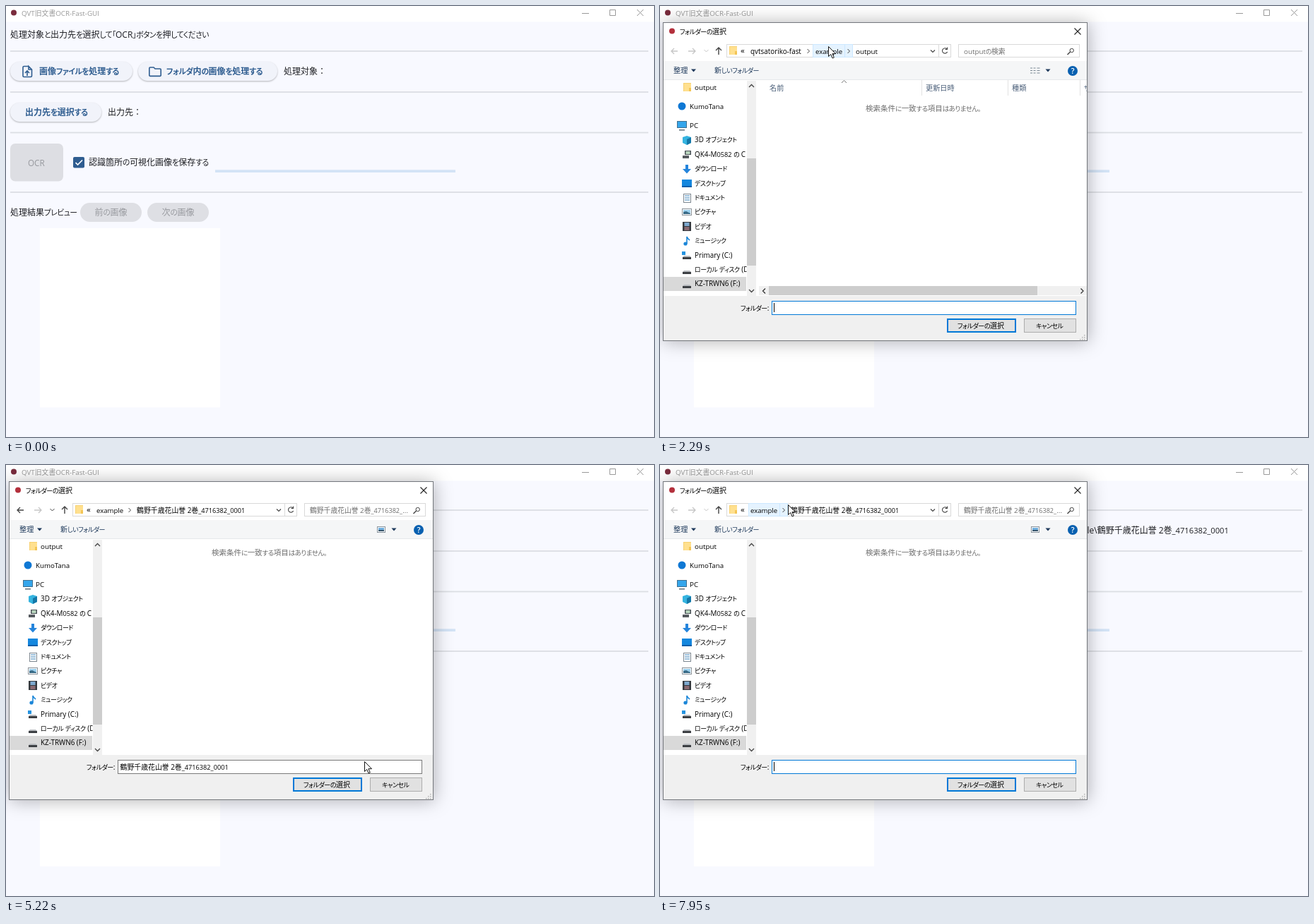
An HTML page for the animation above (7.99 s loop, 917 by 611 pixels).

```html
<!DOCTYPE html>
<html lang="ja">
<head>
<meta charset="utf-8">
<title>OCR</title>
<style>
html, body { margin: 0; width: 100%; height: 100%; overflow: hidden; background: #f8f9ff; }
svg { display: block; width: 100%; height: 100%; }
text { font-family: "Open Sans", "Noto Sans CJK JP", "Noto Sans CJK", sans-serif; white-space: pre; }
.k { font-size: .9em; letter-spacing: -.05em; font-feature-settings: "palt"; }
.d { font-size: .93em; }
.b { font-weight: 600; }
.m { font-weight: 500; }
.pill { filter: drop-shadow(0 1px 1px rgba(0,0,0,.28)); }
#dialog > .frame { filter: drop-shadow(1px 1px 13px rgba(0,0,0,.3)); }
</style>
</head>
<body>
<svg id="stage" viewBox="0 0 917 611"></svg>
<script>
const LOOP = 7990;
const BOOK = '鶴野千歳花山誉 2巻_4716382_0001';
const APP = 'qvtsatoriko-fast';
const BLUE = '#2f5d90', GREY = '#6d6d6d', ACCENT = '#0078d7';

// Kana and long numbers are set a little smaller than the rest of the line.
const runs = s => s.replace(/([ぁ-ヿ「」。]+)|[\d_\/:]{4,}/g,
  (m, kana) => `<tspan class="${kana ? 'k' : 'd'}">${m}</tspan>`);
const T = (x, cy, s, size = 10, fill = '#000', more = '') =>
  `<text x="${x}" y="${Math.round(cy + size * .37)}" font-size="${size}" fill="${fill}" ${more}>${runs(s)}</text>`;
const R = (x, y, w, h, fill, more = '') =>
  `<rect x="${x}" y="${y}" width="${w}" height="${h}" fill="${fill}" ${more}/>`;
const B = (x, y, w, h, fill, line, more = '') =>
  R(x + .5, y + .5, w - 1, h - 1, fill, `stroke="${line}" ${more}`);
const L = (d, color, width = 1, more = '') =>
  `<path d="${d}" fill="none" stroke="${color}" stroke-width="${width}" ${more}/>`;
const F = (d, fill) => `<path d="${d}" fill="${fill}"/>`;
const C = (x, y, r, fill, more = '') => `<circle cx="${x}" cy="${y}" r="${r}" fill="${fill}" ${more}/>`;
const G = (id, ...parts) => `<g id="${id}">${parts.join('')}</g>`;
const folder = (x, cy) => R(x, cy - 6, 11, 12, '#f7d171') + R(x + 1, cy - 5, 10, 11, '#ffe08f') + R(x + 8, cy + 1, 3, 5, '#f3c555');
const chevron = (x, y) => L(`M${x - 1.5} ${y - 3}l3 3l-3 3`, '#444');
const down = (x, y, color = '#444', w = 1.2) => L(`M${x - 3} ${y - 1.5}l3 3l3-3`, color, w);
const triangle = (x, y) => F(`M${x - 3.5} ${y - 2}h7l-3.5 4z`, '#1e395b');

const pills = [
  { id: 'files', x: 6, y: 79, w: 173 },
  { id: 'folder', x: 187, y: 79, w: 197 },
  { id: 'dest', x: 6, y: 137, w: 129 }
];
const pill = p => `<clipPath id="clip-${p.id}">${R(p.x, p.y, p.w, 27, '#000', 'rx="13.5"')}</clipPath>`
  + R(p.x, p.y, p.w, 27, '#f1f3fa', `rx="13.5" class="pill" id="${p.id}"`)
  + C(0, 0, 0, '#ccd7e4', `id="wave-${p.id}" clip-path="url(#clip-${p.id})"`);
const offPill = (x, s, tx) => R(x, 279, 87, 27, '#dedfe4', 'rx="13.5"') + T(tx, 293, s, 12, '#97999e', 'class="m"');

const mainWindow = () => G('main',
  R(0, 0, 917, 611, '#f8f9ff'), R(0, 0, 917, 22.5, '#fff'),
  C(11, 9.5, 4, '#7a2c3d'),
  G('titleBar',
    T(22, 10, 'QVT旧文書OCR-Fast-GUI', 9.8, 'currentColor'),
    L('M815 10.5h10M854.5 5.5h8v8h-8zM893 5l9 9M902 5l-9 9', 'currentColor')),
  T(6, 41, '処理対象と出力先を選択して「OCR」ボタンを押してください', 12, '#1c1d21'),
  ...[64, 122, 179.5, 264].map(y => R(6, y - .9, 903, 1.8, '#dcdee4')),
  ...pills.map(pill),
  L('M32 85.500h-6.500a1.500 1.500 0 0 0-1.500 1.500v12a1.500 1.500 0 0 0 1.500 1.500h9.500a1.500 1.500 0 0 0 1.500-1.500v-9l-4.500-4.500v4.500h4.500M30 99v-6.500M27 95l3-3l3 3', BLUE, 1.6),
  T(47, 93, '画像ファイルを処理する', 12, BLUE, 'class="b"'),
  L('M204 87h5l2 2h7a1.200 1.200 0 0 1 1.200 1.200v8a1.200 1.200 0 0 1-1.200 1.200h-14a1.200 1.200 0 0 1-1.200-1.200v-10a1.200 1.200 0 0 1 1.200-1.200z', BLUE, 1.6),
  T(227, 93, 'フォルダ内の画像を処理する', 12, BLUE, 'class="b"'),
  T(393, 93, '処理対象：', 12, '#1c1d21'),
  G('target', T(461, 93, `F:\\${APP}\\example\\${BOOK}`, 12, '#1c1d21')),
  T(27, 151, '出力先を選択する', 12, BLUE, 'class="b"'),
  T(144, 151, '出力先：', 12, '#1c1d21'),
  R(6, 195, 75, 53.500, '#dddee3', 'rx="7"'),
  T(31, 222.5, 'OCR', 11.7, '#97999e', 'class="m"'),
  R(95, 214, 16, 15.5, BLUE, 'rx="2"'), L('M98.500 222l3 3l6.500-6.500', '#fff', 1.7),
  T(117, 222, '認識箇所の可視化画像を保存する', 12, '#1c1d21'),
  R(296, 232.300, 340, 3.700, '#d3e3f6'),
  T(6, 293, '処理結果プレビュー', 12, '#1c1d21'),
  offPill(105, '前の画像', 125.5), offPill(200, '次の画像', 220.5),
  R(48, 315, 255, 254, '#fff'));

const drive = y => F(`M34 ${y + 1}h8l2 2h-12z`, '#b9bcc0') + R(32, y + 3, 12, 3, '#3c3f43');
const places = [
  ['3D オブジェクト', y => F(`M38 ${y - 6}l6 2v8l-6 3l-6-3v-8z`, '#35b4e0') + F(`M38 ${y - 1}l6-3v8l-6 3z`, '#1478a8')],
  ['QK4-M0582 の C', y => R(35, y - 5, 9, 6, '#4a5157') + R(36.5, y - 4, 6, 4, '#b8d5bd') + R(32, y + 2, 9, 4, '#565b60')],
  ['ダウンロード', y => F(`M36 ${y - 6}h4v6h4l-6 6.500l-6-6.500h4z`, '#2585dc')],
  ['デスクトップ', y => R(31, y - 5, 14, 11, '#1487de') + R(31, y + 4, 14, 2, '#0b5da8')],
  ['ドキュメント', y => B(33, y - 6, 11, 13, '#fff', '#7d8790') + L(`M35 ${y - 3}h7M35 ${y}h7M35 ${y + 3}h7`, '#3d83b8')],
  ['ピクチャ', y => B(31, y - 5, 14, 10, '#fff', '#8a9299') + R(33, y - 3, 10, 6, '#9bd0ee') + F(`M33 ${y + 3}v-3l4-1l6 3v1z`, '#386a86')],
  ['ビデオ', y => R(32, y - 6, 12, 13, '#34383d') + R(34.5, y - 5, 7, 5, '#7ea9cf') + R(34.5, y + 1, 7, 5, '#8a6a72')],
  ['ミュージック', y => C(36, y + 4, 2.600, '#1b86d8') + L(`M38 ${y + 4}v-10q1 3 4 5`, '#1b86d8', 1.6)],
  ['Primary (C:)', y => drive(y) + R(31, y - 5, 5, 5, '#2593e0')],
  ['ローカル ディスク (D:)', drive],
  ['KZ-TRWN6 (F:)', drive]
];
const sidebar = () =>
  R(5, 384, 117, 20, '#d9d9d9') + folder(33, 115) + T(49, 115.5, 'output', 9.8)
  + C(31, 142, 5.5, '#0f78d4') + T(42, 142.5, 'KumoTana', 9.7)
  + B(24, 163, 14, 10, '#35a6ec', '#41708f') + R(27, 175, 8, 1.500, '#5d6b75') + T(42, 169.5, 'PC', 9.8)
  + `<clipPath id="side">${R(5, 106, 117.500, 304, '#000')}</clipPath><g clip-path="url(#side)">`
  + places.map(([name, icon], i) => icon(Math.round(190 + i * 20.4)) + T(49, 189.7 + i * 20.4, name, 9.9)).join('') + '</g>'
  + R(123, 106, 13, 305, '#f0f0f0') + R(123, 216, 13, 152, '#cdcdcd')
  + L('M126 115l3.500-3.500l3.500 3.500M126 402l3.500 3.500l3.500-3.500', '#444', 1.3);

const rows = [
  ['output', '14:31'],
  [BOOK, '14:29'],
  ['五七夜ことはぐさ_6148205_0001', '13:54'],
  ['雲海夢路銀小箱 _ 3巻_3057916_0001', '14:26']
];
const row = ([name, time], i) => {
  const y = 140.5 + i * 18;
  return folder(157, y) + T(173, y, name, 9.9) + T(376, y, '2024/11/19 ' + time, 10, GREY)
    + T(498, y, 'ファイル フォルダー', 9.9, GREY);
};
const empty = y => T(291, y, '検索条件に一致する項目はありません。', 10.5, GREY);
const search = s => T(430, 64, s, 9.8, GREY);
const base = T(128, 64, APP, 9.9) + chevron(210, 64) + T(220, 64, 'example', 9.6) + chevron(267, 64);

const dialog = () => G('dialog',
  B(4, 23, 601, 452, '#fff', '#74777c', 'class="frame"'),
  C(17, 35.5, 4, '#b3303c'), T(28, 36, 'フォルダーの選択'),
  L('M586.500 31.500l9 9M595.500 31.500l-9 9', '#222', 1.1),
  G('nav', L('M25 64h-9M20 60l-4 4l4 4', 'currentColor', 1.3), down(65.5, 63.500, 'currentColor', 1)),
  L('M40 64h9M46 60l4 4l-4 4', '#c6c6c6', 1.3),
  L('M83 69v-10M79 63l4-4l4 4', '#444', 1.4),
  B(94, 54, 318, 19, '#fff', '#d9d9d9'),
  G('crumb', B(0, 54, 60, 19, '#e5f3ff', '#cce8ff', 'id="crumbBox"'), L('M0 54v19', '#cce8ff', 1, 'id="crumbLine"')),
  folder(98, 63), T(114, 62.5, '«', 11.5),
  down(386, 64), L('M394.500 54v19', '#d9d9d9'),
  L('M406 61a3.700 3.700 0 1 0 .6 4M406.500 58.500v3h-3', '#444', 1.1),
  B(422, 54, 172, 19, '#fff', '#d9d9d9'),
  L('M580.500 65l-4 4', '#444', 1.4), L('M580 63a2.700 2.700 0 1 0 5.400 0a2.700 2.700 0 1 0-5.400 0', '#444'),
  R(5, 78, 599, 27, '#f5f6f7'), R(5, 104, 599, 1, '#e6e8ea'),
  T(19, 91.5, '整理', 10.2, '#1e395b'), triangle(47.5, 91.5),
  T(77, 91.5, '新しいフォルダー', 10, '#1e395b'), triangle(549, 91.5),
  C(584, 92, 7, '#0860b0'), T(581.7, 92, '?', 10.5, '#fff', 'class="b"'),
  sidebar(),
  G('columns',
    R(370, 105, 1, 22, '#e2e2e2'), R(492, 105, 1, 22, '#e2e2e2'), R(594, 105, 1, 22, '#e2e2e2'),
    L('M257 109l3.500-3.500l3.500 3.500', '#777'),
    T(155, 116, '名前', 10.2, '#4c607a'), T(376, 116, '更新日時', 10.2, '#4c607a'), T(498, 116, '種類', 10.2, '#4c607a'),
    `<clipPath id="edge">${R(595, 105, 9, 22, '#000')}</clipPath>`,
    T(600, 116, 'サイズ', 10.2, '#4c607a', 'clip-path="url(#edge)"'),
    L('M524 88h3M524 91.500h3M524 95h3M528.500 88h3M528.500 91.500h3M528.500 95h3M533.500 88h4M533.500 91.500h4M533.500 95h4', '#7b8793', 1.2),
    R(140, 397, 464, 13, '#f0f0f0'), R(154, 397, 380, 13, '#cdcdcd'),
    L('M149 400.500l-3.500 3.500l3.500 3.500M595.500 400.500l3.500 3.500l-3.500 3.500', '#333', 1.3)),
  G('inOutput', base, T(277, 64, 'output', 9.8), search('outputの検索'), empty(145.5)),
  G('inExample', base, search('exampleの検索'), R(152, 150, 451, 18, '#e5f3ff', 'id="rowHover"'), rows.map(row).join('')),
  G('inBook', T(128, 64, 'example', 9.6), chevron(175, 64), T(185, 64, BOOK, 9.9),
    search(BOOK.slice(0, -4) + '...'), empty(124.5),
    B(525, 87, 12, 9, '#fff', '#87929c'), R(527, 89, 8, 3, '#6faede'), R(527, 92, 8, 2, '#35546c')),
  R(5, 411, 599, 63, '#f0f0f0'),
  T(114, 428.5, 'フォルダー:', 10),
  B(158, 418, 431, 20, '#fff', ACCENT, 'id="field"'),
  G('caret', R(161, 421, 1, 13, '#000')),
  G('selected', R(160, 421, 40, 13, ACCENT), T(161.5, 428, 'example', 9.6, '#fff')),
  G('value', T(161.5, 428, BOOK, 9.9)),
  R(407, 444, 96, 18, '#e1e1e1', `id="accept" stroke="${ACCENT}" stroke-width="2"`), T(421, 453, 'フォルダーの選択', 10),
  B(515, 443, 74, 20, '#e1e1e1', '#adadad'), T(532, 453, 'キャンセル', 10),
  ...[[600, 466], [597, 469], [600, 469], [594, 472], [597, 472], [600, 472]].map(([x, y]) => R(x, y, 1.500, 1.500, '#b5b5b5')));

const pointer = G('pointer',
  C(1, -1, 10, '#f6ee2c', 'id="glow" opacity=".85"'),
  '<g fill="#fff" stroke="#111" stroke-linejoin="round">',
  '<path id="arrow" d="M.5.5v14l3.200-3l2.400 5.500l2.200-1l-2.400-5.300h4.600z"/>',
  '<path id="hand" d="M-1.500 1.500a1.700 1.700 0 0 1 3.400 0v5.500l2-.8l2.200 1l2-.2l1.300 1.500l1.400.6v4.400l-2 5.500h-7l-4.500-7.500c-.6-2 1-2.400 2.200-.8z"/></g>');

const stage = document.getElementById('stage');
stage.innerHTML = mainWindow() + dialog() + pointer;
const $ = id => document.getElementById(id);
const show = (id, on) => $(id).style.display = on ? '' : 'none';
const set = (id, attrs) => { for (const k in attrs) $(id).setAttribute(k, attrs[k]); };

// time, x, y of the pointer tip
const path = [
  [440, 593, 291], [800, 346, 80], [960, 326, 83], [1430, 326, 83], [1710, 395, 57], [1890, 395, 57],
  [2290, 238, 57], [2690, 238, 57], [3270, 203, 164], [3740, 202, 165], [4860, 202, 165],
  [5130, 515, 400], [5220, 507, 420], [5330, 495, 453], [5520, 495, 453], [6450, 495, 453],
  [7000, 102, 146], [7440, 102, 146], [7950, 180.5, 56]
];
const clicks = [[1230, 1370], [2500, 2630], [3800, 3990], [5670, 5800], [7040, 7170]];
const opens = [[1500, 5800], [7400, LOOP]];
const crumbs = {
  inOutput: [[125, 216], [216, 273], [273, 313], [394, 411]],
  inExample: [[125, 216], [216, 273]],
  inBook: [[125, 181], [181, 343]]
};
const within = (t, spans) => spans.find(([a, b]) => t >= a && t < b);

function pointerAt(t) {
  const i = path.findIndex(p => p[0] > t);
  if (i < 0) return path[path.length - 1].slice(1);
  if (!i) return path[0].slice(1);
  const [a, b] = [path[i - 1], path[i]];
  const u = (t - a[0]) / (b[0] - a[0]), e = u * u * (3 - 2 * u);
  return [1, 2].map(k => a[k] + (b[k] - a[k]) * e);
}

function draw(t) {
  const [x, y] = pointerAt(t);
  const over = (x0, y0, w, h) => t >= 440 && x >= x0 && x < x0 + w && y >= y0 && y < y0 + h;
  const open = within(t, opens);
  const waves = { folder: [1300, 326, 83], dest: [7100, 93, 150] };

  // main window
  $('titleBar').style.color = within(t, [[1230, 1500], [5800, 7110]]) ? '#000' : '#999';
  show('target', t >= 5800);
  let hover = false;
  for (const p of pills) {
    const on = !open && over(p.x, p.y, p.w, 27);
    hover = hover || on;
    set(p.id, { fill: on ? '#dfe6f0' : '#f1f3fa' });
    const [start, cx, cy] = waves[p.id] || [LOOP, 0, 0];
    set('wave-' + p.id, { cx, cy, r: on ? Math.max(0, t - start) * .15 : 0 });
  }

  // folder dialog
  show('dialog', open);
  if (open) {
    $('dialog').style.opacity = Math.min(1, .3 + (t - open[0]) / 130);
    const place = t < 2630 ? 'inOutput' : t < 3990 ? 'inExample' : 'inBook';
    const again = t >= 7400;
    for (const id in crumbs) show(id, id === place);
    show('columns', place !== 'inBook');
    $('nav').style.color = t >= 2630 && !again ? '#444' : '#c6c6c6';

    const c = y >= 54 && y < 73 && within(x, crumbs[place]);
    show('crumb', c);
    if (c) {
      set('crumbBox', { x: c[0] + .5, width: c[1] - c[0] - 1, fill: within(t, clicks) ? '#cce8ff' : '#e5f3ff' });
      set('crumbLine', { transform: `translate(${c[1] - 11.500})` });
      show('crumbLine', c[1] - c[0] > 30);
    }

    const i = Math.floor((y - 132) / 18);
    show('rowHover', i >= 0 && i < 4);
    set('rowHover', { y: 132 + i * 18, fill: t >= 3800 ? '#cce8ff' : '#e5f3ff' });

    const named = t >= 3860 && !again;
    show('caret', place === 'inOutput' || again);
    show('selected', place === 'inExample' && !named);
    show('value', named);
    set('field', { stroke: named ? '#7a7a7a' : ACCENT });
    set('accept', { fill: over(406, 443, 98, 20) ? '#e5f1fb' : '#e1e1e1' });
  }

  // pointer
  const hand = hover && !within(t, [[1370, 1500], [7170, LOOP]]);
  show('pointer', t >= 440);
  set('pointer', { transform: `translate(${Math.round(x)} ${Math.round(y)})` });
  show('glow', within(t, clicks));
  show('hand', hand);
  show('arrow', !hand);
}

const began = performance.now();
(function tick() {
  draw((performance.now() - began) % LOOP);
  requestAnimationFrame(tick);
})();
</script>
</body>
</html>
```
